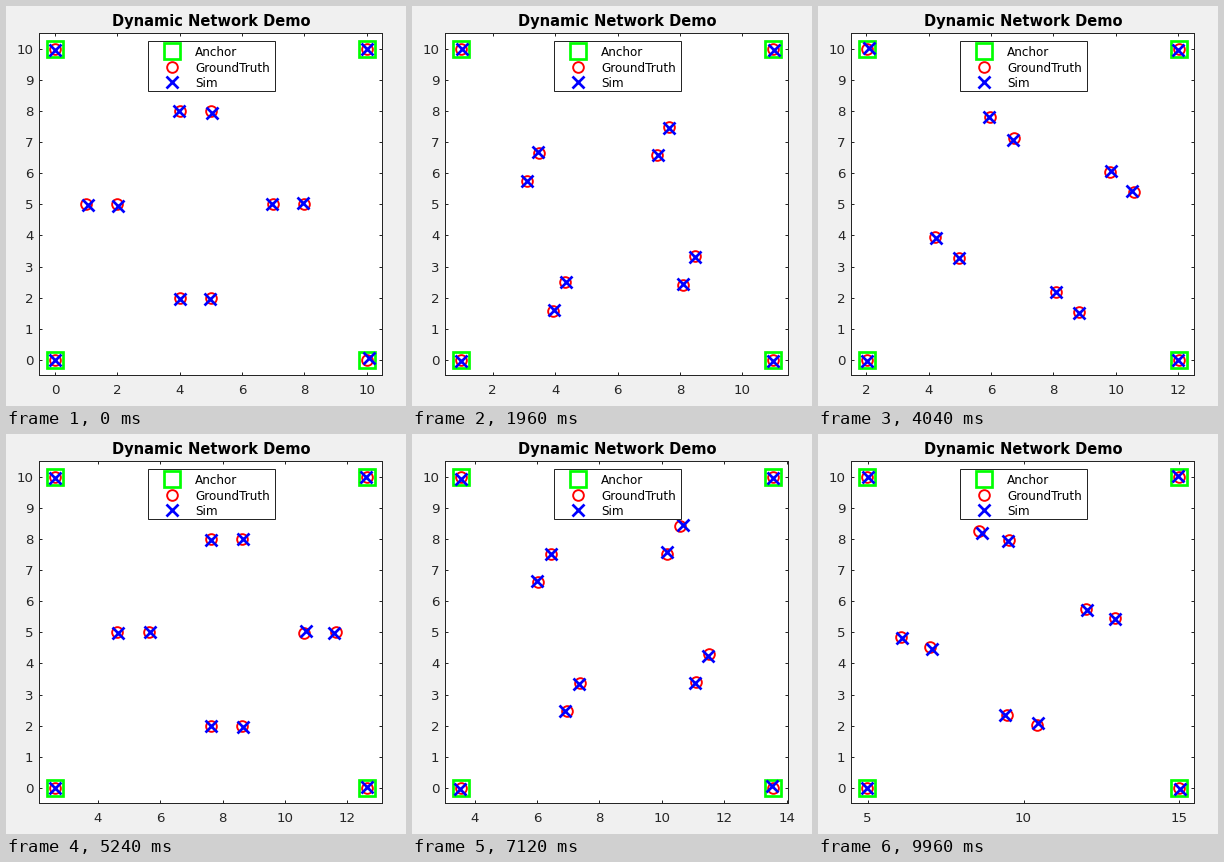
A matplotlib script for the animation above (10000 ms loop, 400x400 px).

```python
import numpy as np
import matplotlib.pyplot as plt
from matplotlib.animation import FuncAnimation
from matplotlib.patches import Rectangle

FRAMES, INTERVAL = 250, 40
SIZE = 400
PX = 0.72                      # points per pixel at 100 dpi
INK = (38 / 255,) * 3
DRIFT, ORBIT, SPIN = 0.02, -0.012, 0.024   # per frame
RADIUS = 3
NOISE = 0.035

STYLES = {
    "Anchor": dict(marker="s", ms=16 * PX, mew=2.7 * PX, mec="#00ff00"),
    "GroundTruth": dict(marker="o", ms=10.7 * PX, mew=1.9 * PX, mec="#ff0000"),
    "Sim": dict(marker="x", ms=11.6 * PX, mew=2.7 * PX, mec="#0000ff"),
}

plt.rcParams["font.family"] = "DejaVu Sans"
fig = plt.figure(figsize=(4, 4), dpi=100, facecolor=(240 / 255,) * 3)


def make_plot():
    ax = fig.add_axes([33.4 / SIZE, 1 - 369.4 / SIZE, 343 / SIZE, 342 / SIZE])
    ax.set_ylim(-0.5, 10.5)
    ax.set_yticks(range(11))
    ax.tick_params(direction="in", top=True, right=True, length=3.4 * PX,
                   width=PX, color=INK, labelcolor=INK, labelsize=13.33 * PX)
    ax.tick_params(axis="x", pad=9 * PX)
    ax.tick_params(axis="y", pad=6 * PX)
    for spine in ax.spines.values():
        spine.set(linewidth=PX, color=INK)
    return ax


def draw_markers(ax, x, y, style):
    return ax.plot(x, y, ls="none", mfc="none", zorder=3, **style)[0]


def make_overlay():
    """Title and legend, laid out in pixels from the top left."""
    ax = fig.add_axes([0, 0, 1, 1], zorder=5)
    ax.set(xlim=(0, SIZE), ylim=(SIZE, 0))
    ax.axis("off")
    ax.text(205, 20, "Dynamic Network Demo", ha="center", va="baseline",
            size=14.67 * PX, weight="bold", color="black")
    ax.add_patch(Rectangle((142.2, 35.2), 127, 50, fc="white", ec=INK, lw=PX))
    for row, (label, style) in enumerate(STYLES.items()):
        y = 44.7 + 15.8 * row
        draw_markers(ax, [166.3], [y], style)
        ax.text(189, y + 5, label, va="baseline", size=12 * PX, color="black")


ax = make_plot()
make_overlay()
anchors, truth, sim = [draw_markers(ax, [], [], s) for s in STYLES.values()]
corners = np.array([(0, 0), (10, 0), (0, 10), (10, 10)], float)


def nodes(n):
    """Four leaders on a circle, each with a follower one unit behind."""
    angle = ORBIT * n + np.arange(4) * np.pi / 2
    leaders = 5 + RADIUS * np.column_stack([np.cos(angle), np.sin(angle)])
    heading = np.array([np.cos(SPIN * n), np.sin(SPIN * n)])
    return np.vstack([leaders, leaders - heading])


def ticks(low, high):
    step = 5 if low > 4 + 1e-9 else 2
    first = int(np.ceil((low - 1e-9) / step)) * step
    return range(first, int(high + 1e-9) + 1, step)


def update(n):
    shift = np.array([DRIFT * n, 0])
    low, high = shift[0] - 0.5, shift[0] + 10.5
    marks = ticks(low, high)
    ax.set_xticks(marks, [str(m) for m in marks])
    ax.set_xlim(low, high)

    points = np.vstack([corners, nodes(n)]) + shift
    rng = np.random.default_rng(1000 + n)
    anchors.set_data(*points[:4].T)
    truth.set_data(*points.T)
    sim.set_data(*(points + rng.normal(0, NOISE, points.shape)).T)
    return anchors, truth, sim


anim = FuncAnimation(fig, update, frames=FRAMES, interval=INTERVAL,
                     init_func=lambda: update(0), repeat=True, repeat_delay=0)
plt.show()
```
